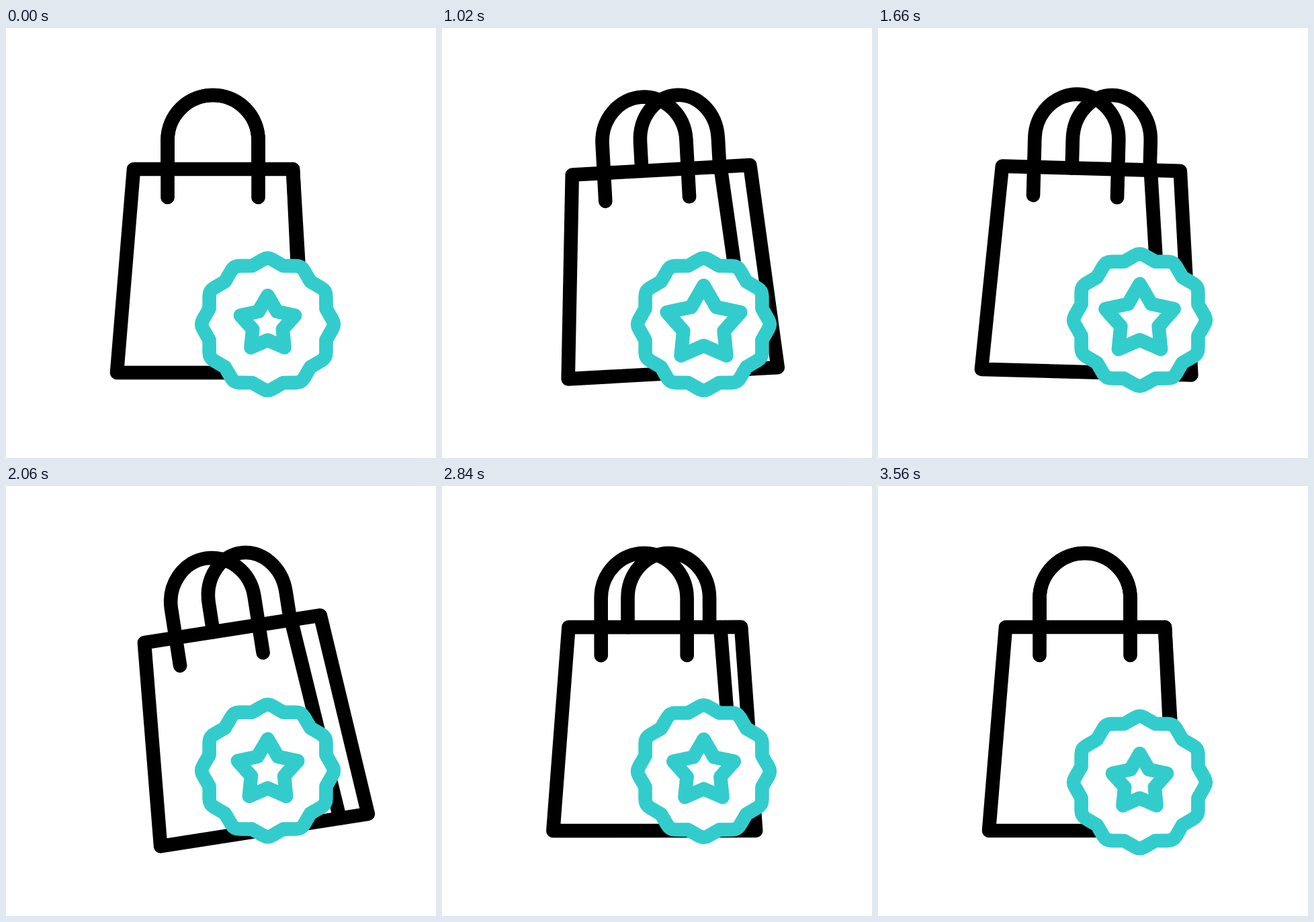
These frames come from a looping animation (640x640 px, 3600 ms). An HTML page:

```html
<!DOCTYPE html>
<html lang="en">
<head>
<meta charset="utf-8">
<title>Shopping bag</title>
<style>
  html, body { margin: 0; width: 100%; height: 100%; overflow: hidden; background: #fff; }
  svg { display: block; width: 100vw; height: 100vh; }
  path { fill: none; stroke: #000; stroke-width: 20.6; stroke-linecap: round; stroke-linejoin: round; }
  #badge path { stroke: #3cc; }
  #badge #rim { fill: #fff; }
</style>
</head>
<body>
<svg viewBox="0 0 640 640">
  <g id="bag">
    <path id="backHandle"/>
    <path id="side"/>
    <path id="front"/>
    <path id="frontHandle"/>
  </g>
  <g id="badge">
    <path id="rim"/>
    <path id="star"/>
  </g>
</svg>
<script>
const LOOP = 3600, CX = 389.5, CY = 441;
const el = id => document.getElementById(id);
const draw = (id, d) => el(id).setAttribute('d', d);
const move = (id, value) => el(id).setAttribute('transform', value);

// Keys are [time, value]
const SWING = [[200, 0], [800, -10], [1400, 10], [2000, -10], [2600, 10], [3080, -10], [3480, 0]];
const DEPTH = [[200, 0], [780, 1], [2600, 1], [3200, 0]];
const LIFT = [[1450, 0], [1960, 20.5], [2460, 0], [2965, 20.5], [3560, 0]];
const GROW = [[600, 0], [1000, 15], [1450, 15], [1960, 2.4], [2460, 15], [2965, 2.4], [3560, 0]];

// Cubic bezier ease (a, 0, b, 1), solved by bisection
function ease(x, a, b) {
  let lo = 0, hi = 1;
  for (let i = 0; i < 24; i++) {
    const u = (lo + hi) / 2, v = 1 - u;
    if (3 * u * v * v * a + 3 * u * u * v * b + u ** 3 < x) lo = u; else hi = u;
  }
  return lo * lo * (3 - 2 * lo);
}

function track(keys, t) {
  if (t <= keys[0][0]) return keys[0][1];
  const i = keys.findIndex(k => k[0] > t);
  if (i < 0) return keys.at(-1)[1];
  const [t0, v0] = keys[i - 1], [t1, v1] = keys[i];
  const fromRest = i === 1 || keys[i - 2][1] === v0;
  return v0 + (v1 - v0) * ease((t - t0) / (t1 - t0), fromRest ? 1 / 3 : 1 / 6, 5 / 6);
}

function polar(r, deg) {
  const a = deg * Math.PI / 180;
  return [CX + r * Math.sin(a), CY - r * Math.cos(a)];
}

function rimPath() {
  let d = '';
  for (let k = 0; k < 12; k++) {
    const tip = polar(100.3, k * 30);
    const [before, after] = [-15, 15].map(off =>
      polar(90, k * 30 + off).map((n, i) => tip[i] + 0.3 * (n - tip[i])));
    d += `${k ? 'L' : 'M'}${polar(90, k * 30 - 15)}L${before}Q${tip} ${after}`;
  }
  return d + 'Z';
}

function starPath(r) {
  const points = Array.from({ length: 10 }, (_, i) => polar(i % 2 ? r * 0.55 : r, i * 36));
  return 'M' + points.join('L') + 'Z';
}

const handlePath = (left, right, foot) =>
  `M${left} ${foot}V167A${(right - left) / 2} 67 0 0 1 ${right} 167V${foot}`;

function render(t) {
  const s = track(DEPTH, t), lift = track(LIFT, t);
  const left = 190 - 2.3 * s;
  const fold = left + 237 - 16 * s, foldFoot = 445 - 10 * s;
  const right = left + 237 + 28 * s, rightFoot = 441.5 + 36 * s;

  draw('front', `M${left} 210H${fold}L${foldFoot} 513H165Z`);
  draw('side', `M${fold} 210H${right}L${rightFoot} 513H${foldFoot}`);
  draw('frontHandle', handlePath(240.5 - 5.5 * s, 375.5 - 15.5 * s, 252));
  draw('backHandle', handlePath(240.5 + 51 * s, 375.5 + 32 * s, 210));
  move('bag', `rotate(${track(SWING, t)} 347 104)`);

  draw('star', starPath(42.7 + track(GROW, t)));
  move('badge', `translate(0 ${-lift})`);
}

draw('rim', rimPath());
const start = performance.now();
function tick() {
  render((performance.now() - start) % LOOP);
  requestAnimationFrame(tick);
}
tick();
</script>
</body>
</html>
```
